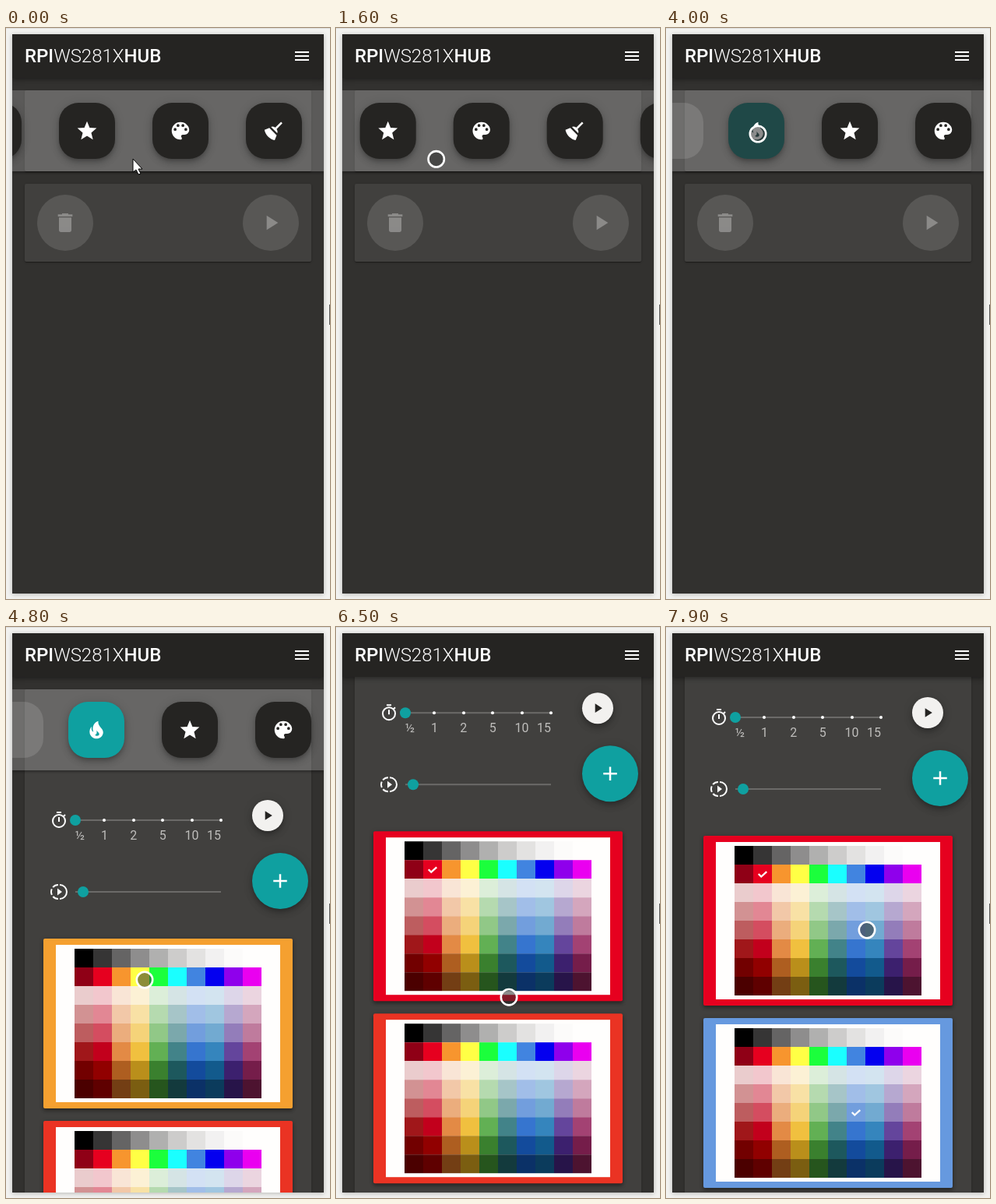
Write an HTML page that moves like this. It is 416x733 px and loops after 8000 ms.

```html
<!DOCTYPE html>
<html lang="en">
<head>
<meta charset="utf-8">
<title>LED hub</title>
<style>
html, body { margin: 0; width: 100%; height: 100%; overflow: hidden; }
body { position: relative; background: #f2f2f0; font-family: Roboto, sans-serif; color: #fff; }
div, svg, span { position: absolute; }
#edge { left: 0; top: 0; width: 416px; height: 1px; background: #dededc; }
#notch { left: 415px; top: 355px; width: 1px; height: 26px; background: #555; }
#frame { left: 8px; top: 8px; width: 400px; height: 718px; box-shadow: 0 1px 6px rgba(0,0,0,.25); }
#view { left: 0; top: 0; width: 416px; height: 733px; background: #32312f; clip-path: inset(8px 8px 7px 8px); }
#page { left: 0; top: 0; }
#header { left: 8px; top: 8px; width: 400px; height: 56px; background: #252422;
  box-shadow: 0 2px 4px -1px rgba(0,0,0,.2), 0 4px 5px rgba(0,0,0,.14), 0 1px 10px rgba(0,0,0,.12); }
#title { left: 16px; top: 0; font-size: 24px; line-height: 56px; font-weight: 300; white-space: nowrap; }
#title b { font-weight: 500; }
.panel { left: 24px; width: 368px; background: #41403e; border-radius: 2px; overflow: hidden;
  box-shadow: 0 2px 1px -1px rgba(0,0,0,.2), 0 1px 1px rgba(0,0,0,.14), 0 1px 3px rgba(0,0,0,.2); }
#panel { top: 80px; }
#content { left: -24px; top: -80px; }
#dock { height: 100px; }
#strip { left: 8px; top: 80px; width: 400px; height: 104px; background: rgba(255,255,255,.2);
  box-shadow: 0 2px 3px rgba(0,0,0,.35); }
#row { left: 0; top: 132px; }
.button { border-radius: 50%; transform: translate(-50%, -50%); }
.raised { box-shadow: 0 3px 5px -1px rgba(0,0,0,.2), 0 6px 10px rgba(0,0,0,.14), 0 1px 14px rgba(0,0,0,.12); }
.tile { border-radius: 25px; }
.line { left: 89px; width: 187px; height: 2px; background: #6b6a68; }
.label { top: 258px; font-size: 16px; line-height: 20px; color: #bebdbb; transform: translateX(-50%); }
.card { left: 48px; width: 320px; height: 218px; border-radius: 2px;
  box-shadow: 0 3px 4px rgba(0,0,0,.3), 0 1px 6px rgba(0,0,0,.2); }
.paper { left: 16px; top: 8px; width: 288px; height: 202px; background: #fffefd; }
.swatch { width: 24px; height: 24px; }
#cursor { left: 0; top: 0; width: 1px; height: 1px; overflow: visible; }
</style>
</head>
<body>
<div id="edge"></div><div id="notch"></div><div id="frame"></div>
<div id="view">
  <div id="page">
    <div id="panel" class="panel"><div id="content"></div></div>
    <div id="strip"></div>
    <div id="row"></div>
    <div id="dock" class="panel"></div>
  </div>
  <div id="header"><div id="title"><b>RPI</b>WS281X<b>HUB</b></div></div>
</div>
<svg id="cursor">
  <path id="arrow" d="M-3 0v17l4-3 3 6 3-1-3-6h5z" fill="#fff" stroke="#000"/>
  <circle id="ring" r="10.2" fill="rgba(45,45,45,.55)" stroke="#fff" stroke-width="2.6"/>
</svg>
<script>
const $ = id => document.getElementById(id);

// Icons on a 24 unit grid
const shape = d => `<path d="${d}" fill="currentColor" fill-rule="evenodd"/>`;
const line = (d, width = 2, dash = 'none') => `<path d="${d}" fill="none" stroke="currentColor"
  stroke-width="${width}" stroke-dasharray="${dash}"/>`;
const disc = (x, y, r) => `M${x - r} ${y}a${r} ${r} 0 1 0 ${2 * r} 0a${r} ${r} 0 1 0 ${-2 * r} 0z`;
const star = Array.from({ length: 10 }, (_, i) => {
  const r = i % 2 ? 4.6 : 10.4, a = i * Math.PI / 5;
  return [12 + r * Math.sin(a), 12.5 - r * Math.cos(a)];
});
const icons = {
  fire: shape('M14 3c-4 1-7 6-5 11-1.6-.5-2.5-3-1.7-5.500C5.500 10 4.600 13 5.300 16c1.200 3.500 4.200 5 6.700 5 4 0 7-3 7-6.500C19 10 13 8.500 14 3z' +
    'M14.500 17.500c-1 1-3 .8-4-.2 2-.7 2.300-2.500 1.700-5 1 2 4 3 2.300 5.200z'),
  star: shape(`M${star.join('L')}z`),
  palette: shape('M12 3a9 9 0 0 0 0 18c2 0 1.500-2 1-2.500-.8-1 0-2.500 1.500-2.500H16a5 5 0 0 0 5-5c0-4-4-8-9-8z' +
    [6.5, 9.5, 14.5, 17.5].map(x => disc(x, Math.abs(x - 12) > 4 ? 10.5 : 6.5, 1.5)).join('')),
  broom: line('M20 3.500l-6.500 6.500') + shape('M9 8c3-2 8 3 6.400 6.400zM2.300 11l5-2 7.500 7.500-2 5C8 21 3 16 2.300 11z'),
  bulb: shape(disc(12, 9, 7) + 'M9 17h6v4H9z'),
  trash: shape('M6 7h12v12a2 2 0 0 1-2 2H8a2 2 0 0 1-2-2zM5 4h14v2H5zM9 3h6v1H9z'),
  play: shape('M8 5v14l11-7z'),
  plus: line('M5 12h14M12 5v14'),
  menu: line('M3 7h18M3 12h18M3 17h18'),
  check: line('M3 12l6 6L21 7', 4),
  timer: line(disc(12, 13, 8) + 'M9 2h6M12 8v6M18 7l2-2'),
  speed: shape('M10 7.5v9l6-4.5z') + line('M13 3a9 9 0 0 1 0 18') + line('M11 3a9 9 0 0 0 0 18', 2, '7.7 2.6')
};
const icon = (name, x, y, size = 30, color = '#fff', id = '') =>
  `<svg id="${id}" viewBox="0 0 24 24" width="${size}" height="${size}"
    style="color:${color};left:${x - size / 2}px;top:${y - size / 2}px">${icons[name]}</svg>`;
const button = (x, y, size, color, cls = '', id = '') =>
  `<div id="${id}" class="button ${cls}" style="left:${x}px;top:${y}px;width:${size}px;height:${size}px;background:${color}"></div>`;

const clamp = (v, a, b) => Math.min(b, Math.max(a, v));
const ramp = (t, a, b) => clamp((t - a) / (b - a), 0, 1);
const smooth = k => k * k * (3 - 2 * k);
const rgb = hex => hex.match(/\w\w/g).map(v => parseInt(v, 16));
const mix = (a, b, k) => `rgb(${rgb(a).map((v, i) => v + (rgb(b)[i] - v) * k)})`;

// Colour chart: greys, pure hues, then tints and shades of softer hues
const pure = '#8f0016 #e6001f #f7952e #ffff45 #1bff3c #1affff #4184e0 #0400ef #8f00ec #ea00f0'.split(' ');
const soft = '#a0171a #c2001c #e38a45 #f0c03f #62b054 #428389 #3675cf #3585bd #64459c #a34273'.split(' ');
const shade = (gain, drop) => hex => `rgb(${rgb(hex).map(v => Math.max(0, v * gain - drop))})`;
const tint = k => hex => mix(hex, '#ffffff', k);
const chart = [
  pure.map((_, i) => mix('#000000', '#fffefd', 1 - (1 - i / 9) ** 2)),
  pure,
  ...[tint(.78), tint(.53), tint(.3), tint(0), shade(.9, 30), shade(.6, 21)].map(rule => soft.map(rule))
];
const grid = chart.map((colors, row) => colors.map((color, col) =>
  `<div class="swatch" style="left:${40 + 24 * col}px;top:${13 + 24 * row}px;background:${color}"></div>`
).join('')).join('');
const card = (n, top, col, row) =>
  `<div id="card${n}" class="card" style="top:${top}px"><div class="paper"></div>${grid}
   ${icon('check', 52 + 24 * col, 25 + 24 * row, 14, '#fff', 'check' + n)}</div>`;

// Effect carousel, with the star at its resting place
const dark = '#252422', teal = '#0fa0a0', faint = 'rgba(255,255,255,.12)', dim = 'rgba(255,255,255,.3)';
$('row').innerHTML = button(-120, 0, 72, faint, 'tile') +
  ['fire', 'star', 'palette', 'broom', 'bulb'].map((name, i) => {
    const x = 120 * i - 16;
    return button(x, 0, 72, dark, 'tile raised', name) + icon(name, x, 0);
  }).join('');
$('dock').innerHTML = button(52, 50, 72, faint) + icon('trash', 52, 50, 32, dim) +
  button(316, 50, 72, faint) + icon('play', 316, 50, 32, dim);
$('header').insertAdjacentHTML('beforeend', icon('menu', 372, 28, 24));

const step = i => 89 + 37.4 * i;
$('content').innerHTML =
  icon('timer', 68, 248, 24) + icon('speed', 68, 340, 24) +
  '<div class="line" style="top:247px"></div><div class="line" style="top:339px"></div>' +
  ['½', 1, 2, 5, 10, 15].map((text, i) => {
    const x = clamp(step(i), 95, 267);
    return button(step(i), 248, 4, '#fff') + `<span class="label" style="left:${x}px">${text}</span>`;
  }).join('') +
  button(step(0), 248, 14, teal) + button(99, 340, 14, teal) +
  button(336, 242, 40, '#f2f1ef', 'raised') + icon('play', 336, 242, 20, dark) +
  button(352, 326, 72, teal, 'raised') + icon('plus', 352, 326) +
  card(1, 400, 1, 1) + card(2, 634, 6, 4);

// Everything the pointer does while pressed
const press = (at, span, x, y, dx = 0, dy = 0, moves = '') => ({ at, end: at + span, x, y, dx, dy, moves });
const pickEffect = 4000, pickRed = 6000, pickBlue = 7400;
const gestures = [
  press(200, 900, 166, 168, -153, 6, 'row'),
  press(1100, 700, 13, 174, 162, -8, 'row'),
  press(2800, 530, 166, 155, 123, -4, 'row'),
  press(pickEffect, 100, 118, 136),
  press(4800, 300, 178, 453, 0, -53, 'page'),
  press(pickRed, 100, 124, 396),
  press(6300, 500, 220, 560, 5, -212, 'page'),
  press(pickBlue, 100, 243, 490),
  press(7600, 300, 258, 256, 0, 133, 'page')
];

// Between gestures the pointer travels to the next one and waits there
function pointerAt(t) {
  const i = gestures.findIndex(g => t <= g.end), g = gestures[i];
  if (t >= g.at || i === 0) {
    const k = ramp(t, g.at, g.end);
    return { x: g.x + g.dx * k, y: g.y + g.dy * k, down: t >= g.at };
  }
  const last = gestures[i - 1], x = last.x + last.dx, y = last.y + last.dy;
  const k = smooth(Math.min(1, 1.5 * ramp(t, last.end, g.at)));
  return { x: x + (g.x - x) * k, y: y + (g.y - y) * k, down: false };
}
const dragged = (t, moves, axis) => gestures.filter(g => g.moves === moves)
  .reduce((sum, g) => sum + g[axis] * ramp(t, g.at, g.end), 0);

function draw(t) {
  const fade = at => ramp(t, at - 70, at + 170);
  const height = 104 + 692 * smooth(ramp(t, pickEffect, pickEffect + 400));
  $('row').style.transform = `translateX(${dragged(t, 'row', 'dx')}px)`;
  $('page').style.transform = `translateY(${dragged(t, 'page', 'dy')}px)`;
  $('panel').style.height = height + 'px';
  $('dock').style.top = 96 + height + 'px';
  $('fire').style.background = mix(dark, teal, fade(pickEffect));
  $('card1').style.background = mix('#f5a030', pure[1], fade(pickRed));
  $('card2').style.background = mix('#ea3323', '#6699df', fade(pickBlue));
  $('check1').style.opacity = +(t >= pickRed);
  $('check2').style.opacity = +(t >= pickBlue);

  const { x, y, down } = pointerAt(t);
  $('cursor').style.transform = `translate(${x}px, ${y}px)`;
  $('ring').style.display = down ? '' : 'none';
  $('arrow').style.display = down ? 'none' : '';
}

// The screen updates ten times a second
function tick() {
  draw(Math.floor(performance.now() % 8000 / 100) * 100);
  requestAnimationFrame(tick);
}
tick();
</script>
</body>
</html>
```
